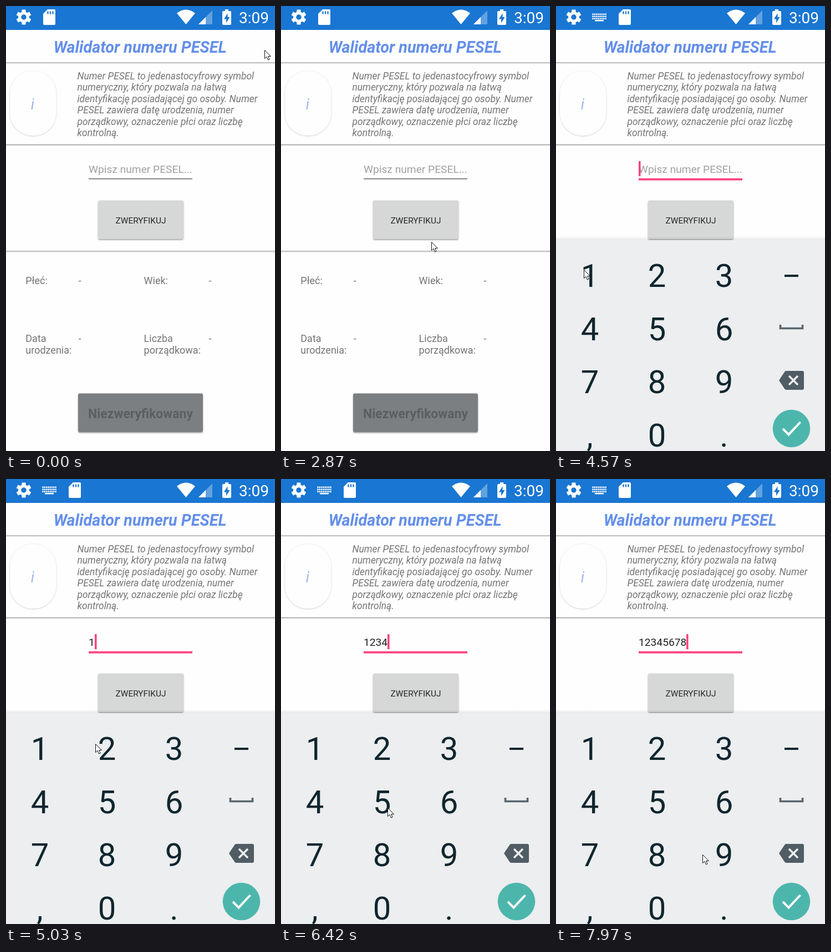
Recreate the animation shown at these times as an HTML page. Size 485 by 800 pixels, loop 8000 ms.

```html
<!DOCTYPE html>
<html lang="pl">
<head>
<meta charset="utf-8">
<title>Walidator numeru PESEL</title>
<style>
  html, body { margin: 0; width: 100%; height: 100%; overflow: hidden; background: #fff; }
  svg { display: block; width: 100vw; height: 100vh; font-family: Roboto, sans-serif; }
  .title { font-size: 28.8px; font-style: italic; font-weight: 700; fill: #648fea; }
  .info { font-size: 17.4px; font-style: italic; fill: #757575; }
  .label { font-size: 18px; fill: #757575; }
  .field { font-size: 19.2px; }
  .digit { font-size: 58px; fill: #10262f; }
  .mid { text-anchor: middle; }
</style>
</head>
<body>
<svg viewBox="0 0 485 800">
  <defs>
    <filter id="shadow" x="-10%" y="-10%" width="120%" height="130%">
      <feDropShadow dx="0" dy="1.6" stdDeviation="1.3" flood-opacity=".38"/>
    </filter>
    <filter id="soft" x="-10%" y="-10%" width="120%" height="120%">
      <feDropShadow dx="0" dy=".6" stdDeviation="1" flood-opacity=".28"/>
    </filter>
    <linearGradient id="edge" x2="0" y2="1">
      <stop offset="0" stop-color="#000" stop-opacity="0"/>
      <stop offset="1" stop-color="#000" stop-opacity=".09"/>
    </linearGradient>
  </defs>
  <rect width="485" height="800" fill="#fefefe"/>

  <!-- status bar -->
  <rect width="485" height="43" fill="#1976d2"/>
  <g id="gear" transform="translate(32 20)" fill="#fff"></g>
  <g id="kbIcon" fill="#fff"></g>
  <g id="card">
    <path d="M75 6H87Q89 6 89 8V32Q89 34 87 34H69Q67 34 67 32V14Z" fill="#fff"/>
    <path d="M75.5 9.5v5M80 9.5v5M84.5 9.5v5" stroke="#1976d2" stroke-width="2.3"/>
  </g>
  <path d="M308 13Q324.5 0 341 13L324.5 33Z" fill="#fff"/>
  <path d="M347 33L372 8V33Z" fill="#fff" opacity=".32"/>
  <path d="M347 33L360 20V33Z" fill="#fff"/>
  <path d="M395 6H401V9H404Q406 9 406 11V32Q406 34 404 34H392Q390 34 390 32V11Q390 9 392 9H395Z" fill="#fff"/>
  <path d="M399.5 13L393 23.5H397V30.5L403.5 20H399.5Z" fill="#1976d2"/>
  <text x="420" y="31" font-size="28" fill="#fff">3:09</text>

  <!-- header and description -->
  <text class="title mid" x="241.6" y="83.5">Walidator numeru PESEL</text>
  <g id="lines"></g>
  <rect x="7" y="117" width="83.5" height="116" rx="41" fill="#fefefe" filter="url(#soft)"/>
  <text class="mid" x="48" y="186" font-size="27" font-style="italic" fill="#9db9f1">i</text>
  <g id="info"></g>

  <!-- form -->
  <text id="hint" class="field" x="149" y="300" fill="#a0a0a0">Wpisz numer PESEL...</text>
  <text id="value" class="field" x="149" y="300" fill="#212121"></text>
  <rect id="underline" x="149" y="309.7" width="187"/>
  <rect id="caret" y="279" width="3.6" height="27" fill="#ff4081"/>
  <rect x="166" y="349.5" width="154" height="69.5" rx="3" fill="#d6d8d7" filter="url(#shadow)"/>
  <text class="mid" x="243" y="390.5" font-size="15.4" fill="#262626">ZWERYFIKUJ</text>

  <!-- results -->
  <g id="labels"></g>
  <rect x="130" y="696.5" width="225" height="69.5" rx="3" fill="#7b7f81" filter="url(#shadow)"/>
  <text class="mid" x="242.5" y="741" font-size="23" font-weight="700" fill="#5b5f61">Niezweryfikowany</text>

  <g id="keyboard">
    <rect y="414" width="485" height="7" fill="url(#edge)"/>
    <rect y="421" width="485" height="500" fill="#eceeef"/>
    <rect id="held" width="121" height="95" fill="#dbe0e1"/>
    <rect id="fading" width="121" height="95" fill="#dbe0e1"/>
    <g id="digits"></g>
    <rect x="412" y="483" width="25" height="4" fill="#10262f"/>
    <path d="M404.5 573V579.5H444.5V573" fill="none" stroke="#59666d" stroke-width="3.6"/>
    <path d="M415 656H444Q447 656 447 659V687Q447 690 444 690H415Q413 690 412 688L402 673L412 658Q413 656 415 656Z" fill="#505d65"/>
    <path d="M420 665L436 681M436 665L420 681" stroke="#eceeef" stroke-width="3.6"/>
    <circle cx="424.5" cy="759.5" r="33.7" fill="#4db6ac"/>
    <path d="M409 760L419.5 770.5L440.5 748" fill="none" stroke="#fff" stroke-width="4"/>
  </g>
  <path id="cursor" d="M.5 .5V15.5L4 12.3L6.5 18L9 17L6.6 11.5H11.3Z" fill="#fff" stroke="#111"/>
</svg>
<script>
const LOOP = 8000, FOCUS = 3730;
const FIRST_TAP = 4770, STEP = 440, HOLD = 100, FADE = 120;
const DIGITS = '12345678';

const $ = id => document.getElementById(id);
const clamp = v => Math.max(0, Math.min(1, v));
const smooth = p => p * p * (3 - 2 * p);
const progress = (t, from, to) => clamp((t - from) / (to - from));
const add = (id, markup) => $(id).insertAdjacentHTML('beforeend', markup);
const set = (id, attrs) => {
  for (const k in attrs) $(id).setAttribute(k, attrs[k]);
};

const keyPos = i => ({ x: 1 + i % 3 * 121, y: 435 + Math.floor(i / 3) * 95.3 });
const tapTime = i => FIRST_TAP + i * STEP;

// pointer moves: start, end, target x and y
const moves = [
  [0, 70, 463, 79], [340, 1090, 64, 105], [1220, 1640, 422, 112],
  [1640, 2020, 440, 222], [2060, 2870, 271, 424], [2900, 3330, 189, 295]
];
// then it visits the keys, drifting around their centres
for (let i = 0; i < DIGITS.length; i++) {
  const { x, y } = keyPos(i), drift = -11 * Math.cos(i * 0.7);
  moves.push([i ? tapTime(i - 1) + 20 : 3950, tapTime(i) - HOLD - 20 - (i ? 0 : 160),
    x + 60 + drift, y + 50 + drift]);
}
moves.push([tapTime(7), tapTime(7) + 110, 264, 675]);

function pointer(t) {
  let x = 466, y = 79;
  for (const [from, to, toX, toY] of moves) {
    const p = smooth(progress(t, from, to));
    x += (toX - x) * p;
    y += (toY - y) * p;
  }
  return [x, y];
}

function build() {
  for (let a = 0; a < 360; a += 60)
    add('gear', `<rect x="-3.6" y="-13.5" width="7.2" height="8" rx="1" transform="rotate(${a})"/>`);
  add('gear', '<circle r="10"/><circle r="4.7" fill="#1976d2"/>');

  for (let i = 0; i < 16; i++)
    add('kbIcon', `<rect x="${65.3 + i % 8 * 3.3}" y="${13.5 + (i >> 3) * 4}" width="2.4" height="2.6"/>`);
  add('kbIcon', '<path d="M65.3 22.8h25.6" stroke="#fff" stroke-width="2.4" stroke-dasharray="2.4 .9"/>');
  add('kbIcon', '<rect x="70" y="25" width="16" height="2.4"/>');

  for (const y of [101, 248.5, 440])
    add('lines', `<rect y="${y}" width="485" height="1.5" fill="#adadad"/>
      <rect y="${y + 1.5}" width="485" height="1.5" fill="#e2e2e2"/>`);

  ['Numer PESEL to jedenastocyfrowy symbol', 'numeryczny, który pozwala na łatwą',
    'identyfikację posiadającej go osoby. Numer', 'PESEL zawiera datę urodzenia, numer',
    'porządkowy, oznaczenie płci oraz liczbę', 'kontrolną.'
  ].forEach((s, i) => add('info', `<text class="info" x="128.5" y="${131.8 + i * 20.5}">${s}</text>`));

  ['Płeć:', 'Wiek:', 'Data urodzenia:', 'Liczba porządkowa:'].forEach((s, i) => {
    const x = 35.3 + i % 2 * 213.3, y = 500.3 + (i >> 1) * 103.3;
    const label = (text, dx, dy) => add('labels', `<text class="label" x="${x + dx}" y="${y + dy}">${text}</text>`);
    s.split(' ').forEach((word, row) => label(word, 0, row * 21.2));
    label('-', 95.5 + i % 2 * 21.5, 0);
  });

  [...'123456789,0.'].forEach((s, i) => add('digits',
    `<text class="digit mid" x="${61 + i % 3 * 121}" y="${Math.round(505.2 + Math.floor(i / 3) * 95.5)}">${s}</text>`));
}

function draw(t) {
  const focused = t >= FOCUS;
  const count = Math.max(0, Math.min(DIGITS.length, Math.floor((t - FIRST_TAP) / STEP) + 1));

  // keyboard slides up while fading in
  const p = progress(t, FOCUS, FOCUS + 194);
  set('keyboard', {
    opacity: clamp(p / 0.6),
    transform: `translate(0 ${120 * (1 - p) ** 2})`
  });
  set('card', { transform: `translate(${46 * smooth(progress(t, FOCUS, FOCUS + 400))} 0)` });
  set('kbIcon', { opacity: progress(t, 3950, 4150) });

  const pressed = count < DIGITS.length && t >= tapTime(count) - HOLD;
  set('held', { ...keyPos(count), opacity: pressed ? 1 : 0 });
  const last = Math.max(0, count - 1);
  set('fading', { ...keyPos(last), opacity: count ? 1 - progress(t, tapTime(last), tapTime(last) + FADE) : 0 });

  $('value').textContent = DIGITS.slice(0, count);
  set('hint', { opacity: count ? 0 : 1 });
  set('underline', focused ? { height: 3.8, fill: '#ff4081' } : { height: 1.8, fill: '#7d7679' });
  set('caret', { x: Math.round(149.2 + count * 10.78), opacity: focused ? 1 : 0 });

  set('cursor', { transform: `translate(${pointer(t).map(Math.round).join(' ')})` });
}

build();
const start = performance.now();
function tick() {
  draw((performance.now() - start) % LOOP);
  requestAnimationFrame(tick);
}
tick();
</script>
</body>
</html>
```
